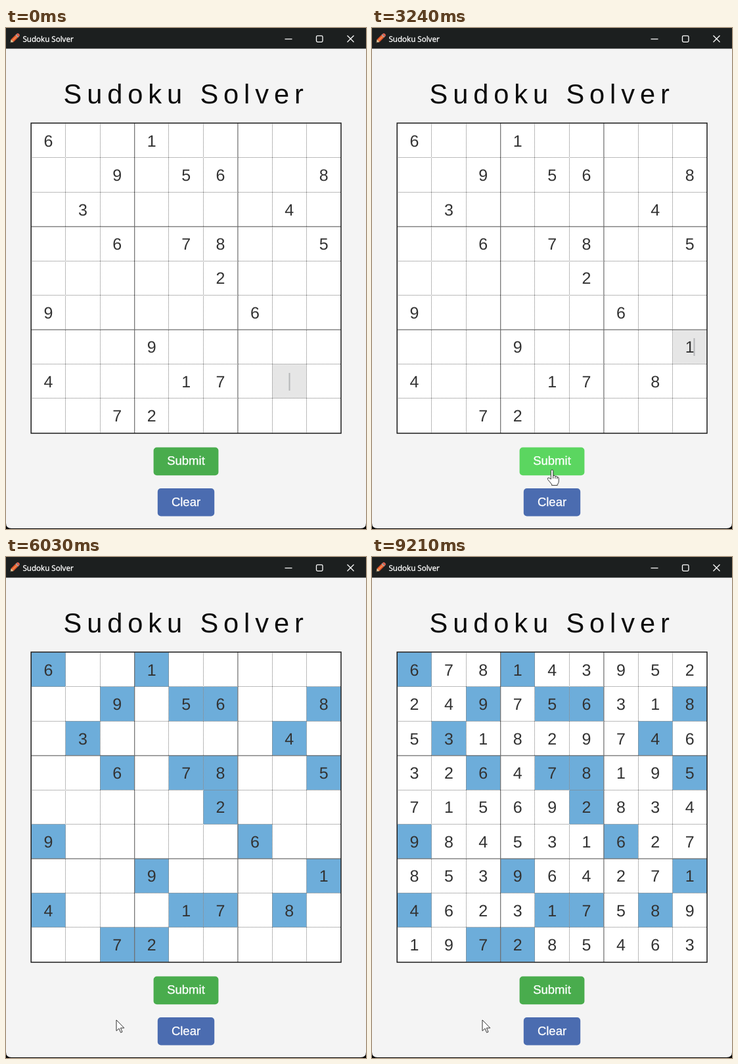
Write an HTML page that moves like this. It is 548 px wide and 764 px high and loops after 9240 ms.

```html
<!DOCTYPE html>
<html lang="en">
<head>
<meta charset="utf-8">
<title>Sudoku Solver</title>
<style>
  html, body { margin: 0; width: 100%; height: 100%; overflow: hidden; background: #000; }
  svg { display: block; width: 548px; height: 764px; font-family: "Liberation Sans", Arial, sans-serif; text-rendering: geometricPrecision; }
  .step { animation: 9.24s step-end infinite; }
  .digits { font-size: 25px; text-anchor: middle; fill: #333; }
  .label { font-size: 18.5px; text-anchor: middle; fill: #fff; stroke: #fff; stroke-width: .3; }
  .solid { stroke: #6c6c6c; stroke-width: 1.2; }
  .dotted { stroke: #777; stroke-dasharray: 1 1; }
  .pointer { fill: #fff; stroke: #333; stroke-width: 1; stroke-linejoin: round; }

  .typed8 { animation-name: typed8; }
  .typed1 { animation-name: typed1; }
  .marked { animation-name: marked; }
  .solved { animation-name: solved; }
  .focus { animation-name: focus; }
  .caret { animation-name: caret; }
  .ibeam { animation-name: ibeam; }
  .arrow { animation-name: arrow; }
  .hand { animation-name: hand; }
  .submit { animation: hover 9.24s linear infinite; }
  .mouse { animation: mouse 9.24s ease-in-out infinite; }

  @keyframes typed8 { 0% { opacity: 0 } 4.33%, 100% { opacity: 1 } }
  @keyframes typed1 { 0% { opacity: 0 } 11.69%, 100% { opacity: 1 } }
  @keyframes marked { 0% { opacity: 0 } 37.88%, 100% { opacity: 1 } }
  @keyframes solved { 0% { opacity: 0 } 87.99%, 100% { opacity: 1 } }
  @keyframes focus {
    0% { transform: none; opacity: 1 }
    7.79% { transform: translate(52.4px, -52.4px); opacity: 1 }
    37.88%, 100% { transform: translate(52.4px, -52.4px); opacity: 0 }
  }
  @keyframes caret {
    0% { transform: translate(431.5px, 526px); opacity: 1 }
    4.33% { transform: translate(438.5px, 526px); opacity: 1 }
    7.79% { transform: translate(483.5px, 473px); opacity: 1 }
    11.69% { transform: translate(490.5px, 473px); opacity: 1 }
    17.42% { transform: translate(490.5px, 473px); opacity: 0 }
    23.16% { transform: translate(490.5px, 473px); opacity: 1 }
    28.9% { transform: translate(490.5px, 473px); opacity: 0 }
    34.63% { transform: translate(490.5px, 473px); opacity: 1 }
    37.88%, 100% { transform: translate(490.5px, 473px); opacity: 0 }
  }
  @keyframes hover {
    0%, 23.4% { fill: #49ac4d }
    25.2%, 44.2% { fill: #5bd660 }
    46%, 100% { fill: #49ac4d }
  }
  @keyframes mouse {
    0%, 17.75% { transform: translate(478px, 496px); animation-timing-function: ease-in }
    21.1% { transform: translate(385px, 640px); animation-timing-function: ease-out }
    23.8%, 26% { transform: translate(286px, 681px) }
    28.5% { transform: translate(280px, 673px) }
    35.7%, 42.75% { transform: translate(274px, 674px) }
    48.16%, 59.5% { transform: translate(163px, 709px) }
    63.85%, 100% { transform: translate(168px, 706px) }
  }
  @keyframes ibeam { 0% { opacity: 0 } 17.75% { opacity: 1 } 20.6%, 100% { opacity: 0 } }
  @keyframes arrow { 0% { opacity: 0 } 20.6% { opacity: 1 } 23.5% { opacity: 0 } 44.3%, 100% { opacity: 1 } }
  @keyframes hand { 0% { opacity: 0 } 23.5% { opacity: 1 } 44.3%, 100% { opacity: 0 } }
</style>
</head>
<body>
<svg viewBox="0 0 548 764">
  <path d="M0 0H548V755Q548 763 540 763H8Q0 763 0 755Z" fill="#f4f4f4"/>
  <path d="M0 0H548V31.6H0Z" fill="#1c1f1f"/>

  <g transform="translate(6.5 22.5) rotate(-45)">
    <path d="M0 0L4.5 -2.8V2.8Z" fill="#e8c79a"/>
    <path d="M0 0L1.8 -1.1V1.1Z" fill="#443"/>
    <path d="M4.5 -2.8H14V2.8H4.5Z" fill="#e2552f"/>
    <path d="M4.5 -1H14V1H4.5Z" fill="#f58a4b"/>
    <path d="M14 -2.8H15.6V2.8H14Z" fill="#b9b9b9"/>
    <path d="M15.6 -2.8H17Q19 -2.8 19 0T17 2.8H15.6Z" fill="#d9604f"/>
  </g>
  <text x="25.5" y="20.6" font-size="11.6" fill="#fff" stroke="#fff" stroke-width=".35" style="font-family: 'Open Sans', 'Noto Sans', sans-serif">Sudoku Solver</text>
  <g fill="none" stroke="#fff" stroke-width="1.3">
    <path d="M424.5 16.8H435.5M519.5 11.5L529.5 21.5M529.5 11.5L519.5 21.5"/>
    <rect x="472.5" y="11.8" width="9.5" height="9.5" rx="1.8"/>
  </g>

  <text x="87.5" y="114.8" font-size="41.6" letter-spacing="7.9" fill="#0c0c0c">Sudoku Solver</text>

  <rect x="38" y="145" width="472" height="473" fill="#fff"/>
  <g id="marks" class="step marked" fill="#6dadda"></g>
  <rect class="step focus" x="405.5" y="513" width="51.5" height="51.5" fill="#e6e6e6"/>
  <g id="lines"></g>
  <rect x="38.2" y="145" width="471.8" height="473" fill="none" stroke="#1a1a1a" stroke-width="1.5"/>
  <g id="given" class="digits"></g>
  <g id="found" class="digits step solved"></g>
  <path class="step caret" d="M0 0V27" stroke="#85888c"/>

  <rect class="submit" x="224.6" y="639.6" width="98.8" height="42.6" rx="5"/>
  <text class="label" x="274" y="666.3">Submit</text>
  <rect x="230.8" y="702" width="86.4" height="42.5" rx="5" fill="#4b6cb0"/>
  <text class="label" x="274" y="729">Clear</text>

  <g class="mouse">
    <path class="step ibeam" d="M-3 -8H3M0 -8V8M-3 8H3" stroke="#222" fill="none"/>
    <path class="step arrow pointer" d="M0 0V16.6L4 13L6.6 19.2L9 18.2L6.4 12.2H11.8Z"/>
    <g class="step hand pointer">
      <path d="M-1.7 14V1.5a1.7 1.7 0 0 1 3.4 0V8.6q3 -.8 3.2 1q2.6 -.6 2.9 1.2q2.4 -.3 2.4 2V17q0 3 -2 5.2V23.4H-.5V21.8L-6.6 14.4q-1 -2.6 1.6 -2.6Z"/>
      <path d="M1.7 8.6V13M4.9 9.6V13.2M7.8 10.8V13.6" fill="none"/>
    </g>
  </g>
</svg>
<script>
  const X = 38.3, Y = 145.5, CELL = 52.4;
  const solution = '678143952 249756318 531829746 326478195 715692834 984531627 853964271 462317589 197285463'.split(' ');
  const clues = '6..1..... ..9.56..8 .3.....4. ..6.78..5 .....2... 9.....6.. ...9....1 4...17.8. ..72.....'.split(' ');

  function add(parent, tag, attrs, text = '') {
    const el = document.createElementNS('http://www.w3.org/2000/svg', tag);
    for (const key in attrs) el.setAttribute(key, attrs[key]);
    el.textContent = text;
    document.getElementById(parent).append(el);
  }

  // the two clues that are typed in while the loop runs
  const typed = { '7,7': 'step typed8', '6,8': 'step typed1' };

  solution.forEach((row, r) => [...row].forEach((digit, c) => {
    const x = X + c * CELL, y = Y + r * CELL;
    const isClue = clues[r][c] !== '.';
    if (isClue) add('marks', 'rect', { x, y, width: CELL, height: CELL });
    add(isClue ? 'given' : 'found', 'text',
      { x: x + CELL / 2, y: y + 35.2, class: typed[[r, c]] || '' }, digit);
  }));

  for (let i = 1; i < 9; i++) {
    const solid = i % 3 === 0, style = solid ? 'solid' : 'dotted';
    const place = v => solid ? v + 0.2 : Math.floor(v) + 0.5;
    add('lines', 'path', { class: style, d: `M${place(X + i * CELL)} 145V618` });
    add('lines', 'path', { class: style, d: `M38 ${place(Y + i * CELL)}H510` });
  }
</script>
</body>
</html>
```
